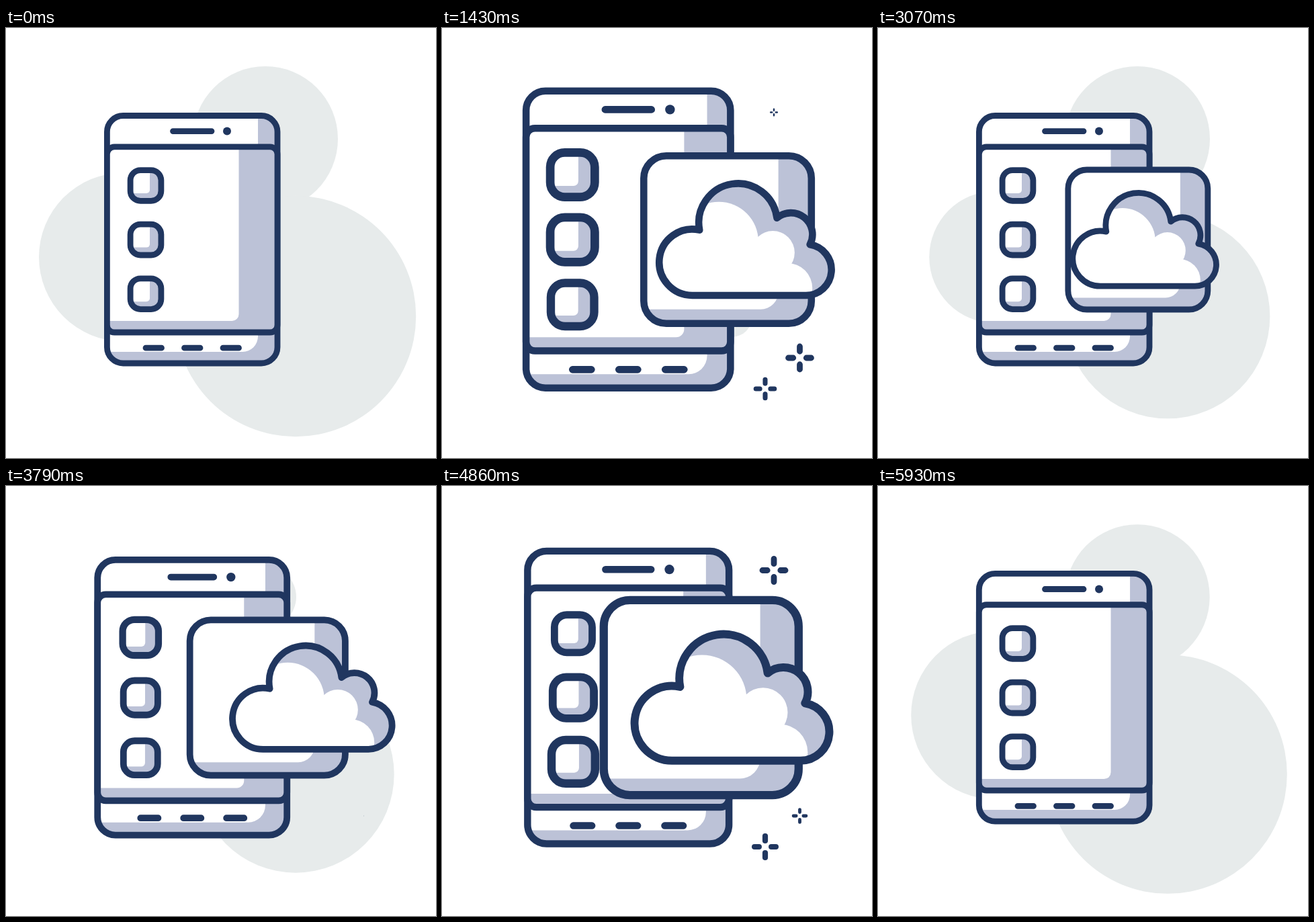
An HTML page for the animation above (6 s loop, 640 px wide and 640 px high).

```html
<!DOCTYPE html>
<html lang="en">
<head>
<meta charset="utf-8">
<title>Phone and cloud</title>
<style>
  html, body { margin: 0; width: 100%; height: 100%; overflow: hidden; background: #fff; }
  svg { display: block; width: 100vw; height: 100vh; }
  .line { fill: none; stroke: #20365f; stroke-width: 8.8; stroke-linecap: round; stroke-linejoin: round; }
  .shade { fill: #bcc2d7; }
  .lit { fill: #fff; }
  .dot { fill: #20365f; }
  .back { fill: #e7ebeb; }
</style>
</head>
<body>
<svg viewBox="0 0 640 640" xmlns="http://www.w3.org/2000/svg">
  <defs>
    <path id="cloudShape" d="M340 384A41 41 0 1 1 349 303A48.61 48.61 0 1 1 445 288A26.8 26.8 0 0 1 486 321A31.7 31.7 0 0 1 481 384Z"/>
    <rect id="bodyShape" x="150.4" y="130.5" width="253.6" height="368.5" rx="24"/>
    <rect id="panelShape" x="150.4" y="176.8" width="253.6" height="276.2" rx="11"/>
    <rect id="cardShape" x="-104" y="-104" width="208" height="208" rx="28"/>
    <rect id="iconShape" x="-22.9" y="-22.9" width="45.8" height="45.8" rx="15"/>
    <clipPath id="cloudClip"><use href="#cloudShape"/></clipPath>
    <clipPath id="bodyClip"><use href="#bodyShape"/></clipPath>
    <clipPath id="panelClip"><use href="#panelShape"/></clipPath>
    <clipPath id="cardClip"><use href="#cardShape"/></clipPath>
    <clipPath id="iconClip"><use href="#iconShape"/></clipPath>
    <g id="icon">
      <use href="#iconShape" class="shade"/>
      <rect class="lit" clip-path="url(#iconClip)" x="-40" y="-40" width="46" height="51.5" rx="5"/>
      <use href="#iconShape" class="line"/>
    </g>
    <path id="spark" class="line" d="M9.8 0H17.1M-9.8 0H-17.1M0 9.8V17.1M0 -9.8V-17.1"/>
  </defs>

  <circle class="back" id="topDisc" cx="386" cy="165"/>
  <circle class="back" id="leftDisc" cx="174.5" cy="341"/>
  <circle class="back" id="bigDisc" cx="431" cy="429"/>

  <use href="#spark" id="spark0"/>
  <use href="#spark" id="spark1"/>
  <use href="#spark" id="spark2"/>

  <g id="phone">
    <use href="#bodyShape" class="shade"/>
    <rect class="lit" clip-path="url(#bodyClip)" x="100" y="90" width="275" height="392" rx="23"/>
    <use href="#bodyShape" class="line"/>
    <use href="#panelShape" class="shade"/>
    <rect class="lit" clip-path="url(#panelClip)" x="100" y="140" width="246.5" height="296" rx="10"/>
    <use href="#panelShape" class="line"/>
    <path class="line" d="M248.5 153.6H306M208 476.2H231.5M265.5 476.2H289M323 476.2H346.5"/>
    <circle class="dot" cx="329" cy="153.6" r="6"/>

    <use href="#icon" id="icon0"/>
    <use href="#icon" id="icon1"/>
    <use href="#icon" id="icon2"/>

    <g id="card">
      <use href="#cardShape" class="shade"/>
      <rect class="lit" clip-path="url(#cardClip)" x="-140" y="-140" width="203" height="226.5" rx="22"/>
      <use href="#cardShape" class="line"/>
    </g>

    <g id="cloud">
      <use href="#cloudShape" class="shade"/>
      <g class="lit" clip-path="url(#cloudClip)">
        <circle cx="373" cy="317" r="49"/>
        <circle cx="440" cy="331" r="27"/>
        <circle cx="458" cy="375" r="31"/>
        <rect x="290" y="298" width="110" height="92"/>
        <rect x="380" y="335" width="78" height="55"/>
      </g>
      <use href="#cloudShape" class="line"/>
    </g>
  </g>
</svg>
<script>
const LOOP = 6000, HALF = LOOP / 2, STEPS = 84;
const get = id => document.getElementById(id);

// Symmetric ease with control points (.54, 0) and (.46, 1)
function ease(p) {
  if (p <= 0) return 0;
  if (p >= 1) return 1;
  let lo = 0, hi = 1;
  for (let i = 0; i < 24; i++) {
    const u = (lo + hi) / 2, v = 1 - u;
    const x = 3 * u * v * (.54 * v + .46 * u) + u * u * u;
    if (x < p) lo = u; else hi = u;
  }
  return lo * lo * (3 - 2 * lo);
}

const step = (t, start, end) => ease((t - start) / (end - start));

// Rises over [a, b] and falls over [c, d], repeating every period
function hump(t, a, b, c, d, period = LOOP) {
  const u = a + ((t - a) % period + period) % period;
  return step(u, a, b) * (1 - step(u, c, d));
}

const beat = (t, start, peak, end) => hump(t, start, peak, peak, end, HALF);

// Eases from one value to the next; each move is [start, end, value]
function glide(t, value, ...moves) {
  for (const [start, end, next] of moves) value += (next - value) * step(t, start, end);
  return value;
}

// Grows in and shrinks away, swelling a little at both ends
const pop = t => hump(t, 90, 600, 4880, 5550)
  + .18 * (hump(t, 90, 600, 600, 1300) + hump(t, 4350, 4880, 4880, 5550));

const cardX = t => glide(t, 95, [100, 700, 140], [960, 2030, 95], [2270, 3070, 110], [3070, 4500, 92]);
const cloudX = t => glide(t, 110, [100, 700, 185], [960, 2030, 78], [2270, 3725, 161], [4100, 5600, 102]);

const sparkSpots = [[532.5, 491], [481, 537], [494, 125.5]];

function place(id, x, y, scale, dx = 0, dy = 0) {
  const el = get(id);
  el.style.display = scale > .004 ? "" : "none";
  el.setAttribute("transform", `translate(${x} ${y}) scale(${scale}) translate(${dx} ${dy})`);
}

const setRadius = (id, r) => get(id).setAttribute("r", r);

function draw(t) {
  setRadius("topDisc", 108 * (1 - beat(t, 0, 1470, 3000)));
  setRadius("leftDisc", 125.5 * (hump(t, 1150, 2650, 2400, 4100) + hump(t, 4200, 6000, 6000, 7200)));
  setRadius("bigDisc", 180 * (hump(t, 1820, 3520, 3290, 4790) + hump(t, 4800, 6050, 5900, 8150)));

  place("phone", 277, 315, 1 + .2 * beat(t, 0, 1490, 3000), -277, -315);

  for (let i = 0; i < 3; i++) {
    const iconTime = t - 185 * i, sparkTime = t - 205 * i;
    place("icon" + i, 208, 234.5 + 80.6 * i, 1 + .21 * beat(iconTime, 480, 1330, 2110));
    place("spark" + i, ...sparkSpots[i], beat(sparkTime, 720, 1480, 2270));
  }

  place("card", 277 + cardX(t), 315, pop(t));
  place("cloud", 277 + cloudX(t), 314.6, pop(t - 150), -406, -314.5);
}

const begin = performance.now();
function tick() {
  const t = (performance.now() - begin) % LOOP;
  draw(Math.floor(t * STEPS / LOOP) * LOOP / STEPS);
  requestAnimationFrame(tick);
}
tick();
</script>
</body>
</html>
```
